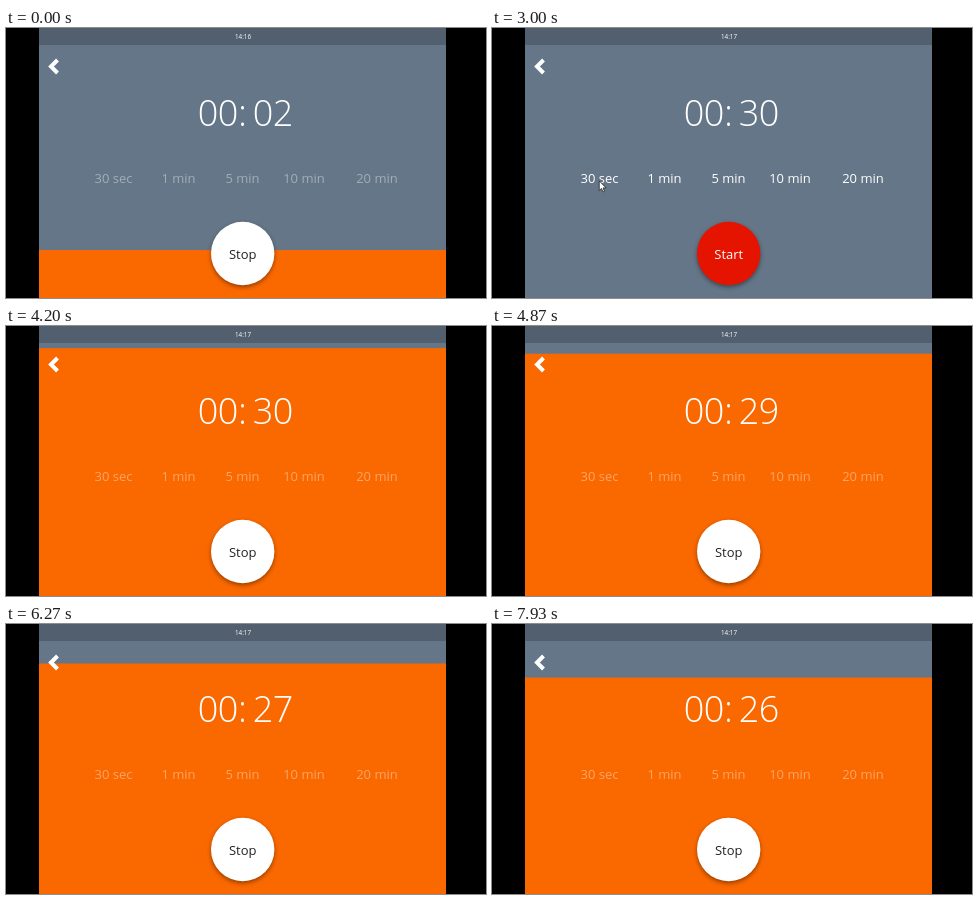
Recreate the animation shown at these times as an HTML page. Size 480 px wide and 270 px high, loop 8 s.

```html
<!DOCTYPE html>
<html lang="en">
<head>
<meta charset="utf-8">
<title>Countdown timer</title>
<style>
  html, body { margin: 0; width: 100%; height: 100%; overflow: hidden; background: #000; }
  svg { display: block; width: 480px; height: 270px; }
  text { font-family: "Open Sans", "Noto Sans", sans-serif; font-size: 13px; fill: #fff; text-anchor: middle; }
  #clock { font-size: 6.3px; }
  .digits text { font-size: 36px; font-weight: 300; letter-spacing: -.7px; text-anchor: start; }
  #disc { filter: drop-shadow(0 2px 2px rgba(0, 0, 0, .4)); }
</style>
</head>
<body>
<svg viewBox="0 0 480 270">
  <rect width="480" height="270" fill="#000"/>
  <rect x="33" width="407" height="270" fill="#647687"/>
  <rect id="fill" x="33" y="17" width="407" height="253" fill="#fa6800"/>
  <rect x="33" width="407" height="17" fill="#525f6e"/>
  <text id="clock" x="237" y="10.6"></text>
  <path d="M51.5 32L45 38.5L51.5 45" fill="none" stroke="#fff" stroke-width="4"/>
  <g class="digits">
    <text x="191.8" y="98">00</text>
    <text x="232.3" y="98">:</text>
    <text id="secs" x="246.8" y="98"></text>
  </g>
  <g id="presets">
    <text x="107.5" y="155">30 sec</text>
    <text x="172.5" y="155">1 min</text>
    <text x="236.5" y="155">5 min</text>
    <text x="298" y="155">10 min</text>
    <text x="371" y="155">20 min</text>
  </g>
  <circle id="disc" cx="236.7" cy="225.5" r="31.7"/>
  <text id="action" x="236.7" y="231"></text>
  <path id="cursor" d="M0 0V9.6L2.2 7.6L3.8 11L5.3 10.3L3.8 7H6.9Z" fill="#fff" stroke="#222" stroke-width=".8"/>
</svg>
<script>
const $ = id => document.getElementById(id);
const LOOP = 8000, RESET = 70, MINUTE = 330, PICK = 2870, START = 3600;
const TICK = 868, TOP = 17, HEIGHT = 253, DURATION = 30000;

// Pointer stops: time, x, y
const stops = [
  [2400, 150, 271], [2750, 103, 150], [2950, 103, 150],
  [3400, 222, 232], [3750, 222, 232], [4050, 234, 271]
];

function pointer(t) {
  const i = stops.findIndex(s => s[0] > t);
  if (i < 1) return null;
  const [a, b] = [stops[i - 1], stops[i]];
  const p = (t - a[0]) / (b[0] - a[0]);
  const e = p * p * (3 - 2 * p);
  return [a[1] + (b[1] - a[1]) * e, a[2] + (b[2] - a[2]) * e];
}

function draw(t) {
  const ending = t < RESET;
  const running = ending || t >= START - 40;
  const elapsed = ending ? 24310 + t : Math.max(0, t - START);
  const y = running ? TOP + HEIGHT * elapsed / DURATION : 270;
  $('fill').setAttribute('y', y);
  $('fill').setAttribute('height', 270 - y);

  const secs = running ? 30 - Math.floor(elapsed / TICK) : t >= PICK ? 30 : 0;
  $('secs').textContent = String(secs).padStart(2, '0');
  $('clock').textContent = t < MINUTE ? '14:16' : '14:17';
  $('presets').setAttribute('opacity', running ? .4 : 1);
  $('disc').setAttribute('fill', running ? '#fff' : '#e51400');
  $('action').textContent = running ? 'Stop' : 'Start';
  $('action').style.fill = running ? '#222' : '#fff';

  const pos = pointer(t);
  $('cursor').style.display = pos ? '' : 'none';
  if (pos) $('cursor').setAttribute('transform', `translate(${pos})`);
}

function frame(now) {
  draw(now % LOOP);
  requestAnimationFrame(frame);
}
draw(0);
requestAnimationFrame(frame);
</script>
</body>
</html>
```
